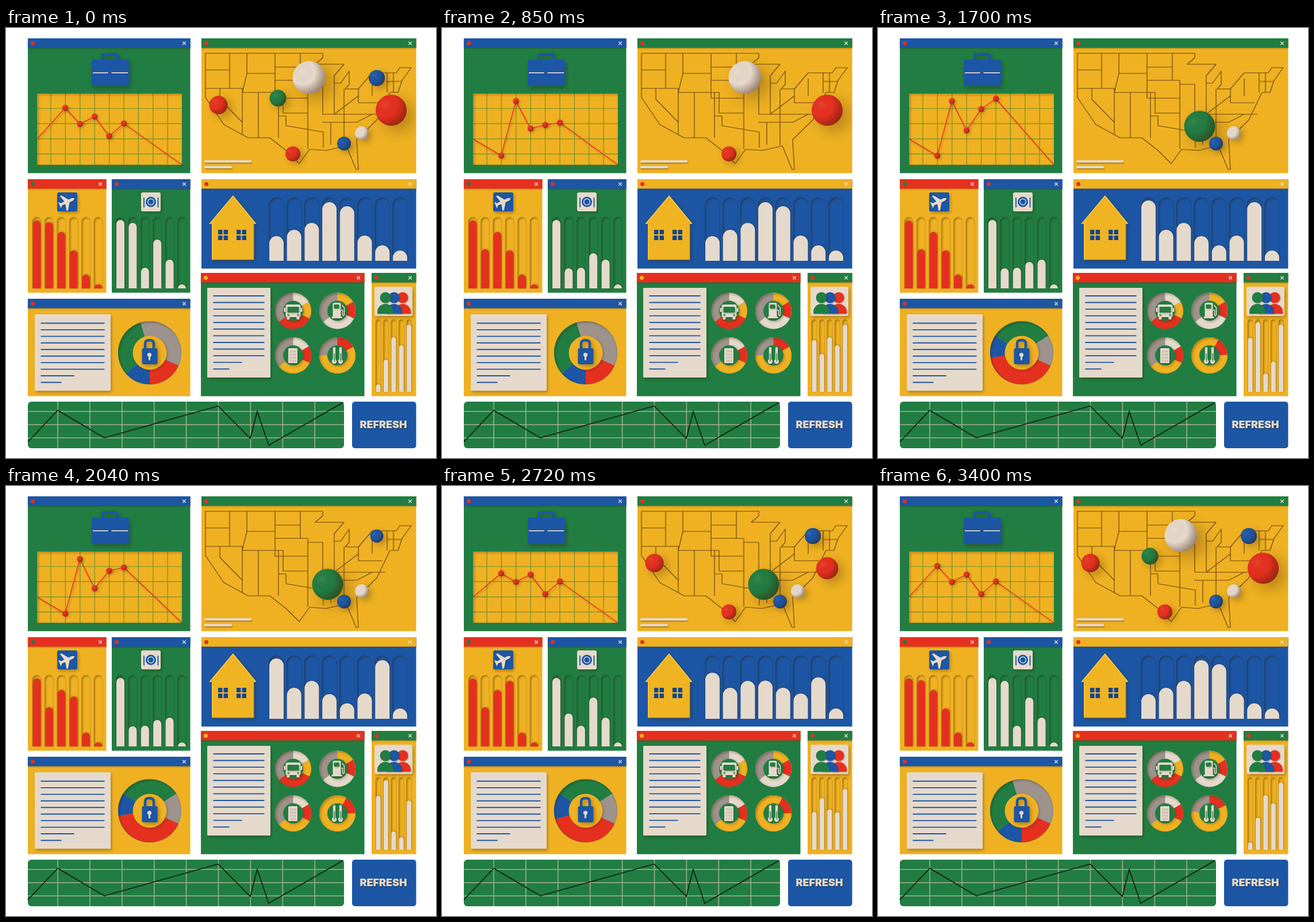
Recreate the animation shown at these times as an HTML page with a canvas. Size 748 by 748 pixels, loop 3570 ms.

```html
<!DOCTYPE html>
<html lang="en">
<head>
<meta charset="utf-8">
<title>Dashboard</title>
<style>
html, body { margin: 0; width: 100%; height: 100%; overflow: hidden; background: #fff; }
canvas { display: block; width: 748px; height: 748px; }
</style>
</head>
<body>
<canvas id="stage" width="748" height="748"></canvas>
<script>
const c = document.getElementById('stage').getContext('2d');
const STEP = 170, STEPS = 21;
const BLUE = '#1c56a4', GREEN = '#217d42', YELLOW = '#efb122', RED = '#e5301f',
      CREAM = '#e5d9cb', GRAY = '#9d938c', BROWN = '#6a4610';

const range = (count, start, gap) => Array.from({ length: count }, (_, i) => start + i * gap);

function ease(u) {
  u = Math.max(0, Math.min(1, u));
  return (1 - Math.cos(Math.PI * u)) / 2;
}
// Goes from a to b starting at step "out", and returns starting at step "back".
function swing(n, a, b, out, back, len = 3.5) {
  return a + (b - a) * (ease((n - out) / len) - ease((n - back) / len));
}

// Bar tops at rest; "to" holds the tops of the bars that move.
const charts = {
  travel: { x: 53.5, gap: 21.4, w: 15, top: 329, base: 453, fill: RED, well: YELLOW,
    tops: [335, 338, 355, 387, 429, 446], to: { 1: 385, 3: 339 },
    out: i => 4.7 * i - 3.7, back: () => 16.5 },
  food: { x: 199, gap: 21.4, w: 15, top: 329, base: 453, fill: CREAM, well: GREEN,
    tops: [334, 339, 417, 368, 403, 446], to: { 1: 418, 3: 407 },
    out: i => i, back: i => 16 - 1.25 * i },
  home: { x: 470.5, gap: 30.7, w: 26, top: 295, base: 405, fill: CREAM, well: BLUE,
    tops: [362, 351, 339, 303, 310, 361, 378, 387], to: { 0: 300, 3: 362, 4: 378, 6: 303 },
    out: () => 5, back: () => 15, len: 2.3 },
  people: { x: 647.5, gap: 13.4, w: 9, top: 507, base: 633, fill: CREAM, well: YELLOW,
    tops: [620, 577, 538, 552, 516], to: { 0: 539, 1: 512, 2: 601, 3: 611, 4: 588 },
    out: i => 2 + 2.1 * i, back: i => 14.6 - .3 * i }
};

// Listed in the order they appear: x, y, radius, color, step of leaving.
const balls = [
  [559.5, 171, 27, GREEN, 17],
  [619, 183, 12, CREAM, 1],
  [588, 201, 12, BLUE, 1],
  [645, 87, 14, BLUE, 1],
  [499, 219, 13, RED, 7],
  [369.5, 134, 16, RED, 1],
  [670, 143, 27, RED, 7],
  [473, 122, 14.5, GREEN, 0],
  [527, 86, 28.5, CREAM, 7]
];

const coast = new Path2D('M347 44H551V52L538 63H588L571 83V96H582L597 75V98L590 106H613L637 78H679L685 69H705L689 91 682 112H668L645 160 610 194 613 246H609L592 205 557 213 528 211 510 236 487 213 459 191H421L379 168 347 121Z');
const borders = new Path2D('M389 44V105M347 73H389M347 105H411V185M372 105V124L411 164M419 44V79H468M419 79L411 112H482V148H525M439 112V191M474 112V191M468 44V122H525M468 68H512M512 44V91M468 91H525V210M474 153H487V170L552 181V208M525 98H551V150H660M550 164H610L637 150M565 164V203M588 106V204M571 96V150L613 118M613 106V130H655M637 88V118M663 78V112M674 78V112M663 93H688');

function shade(dx, dy, blur, a) {
  c.shadowColor = `rgba(45,25,0,${a})`;
  c.shadowOffsetX = dx; c.shadowOffsetY = dy; c.shadowBlur = blur;
}
function raised(draw, dx = 2, dy = 3, blur = 5, a = .32) {
  c.save(); shade(dx, dy, blur, a); draw(); c.restore();
}
function box(x, y, w, h, fill, r = 0) {
  c.fillStyle = fill;
  c.beginPath(); c.roundRect(x, y, w, h, r); c.fill();
}
function disc(x, y, r, fill) {
  c.fillStyle = fill;
  c.beginPath(); c.arc(x, y, r, 0, 7); c.fill();
}
function line(points, color, width) {
  c.strokeStyle = color; c.lineWidth = width;
  c.beginPath(); points.forEach(p => c.lineTo(...p)); c.stroke();
}
function shape(d, fill) { c.fillStyle = fill; c.fill(new Path2D(d)); }
function stroke(d, color, width) {
  c.strokeStyle = color; c.lineWidth = width; c.stroke(new Path2D(d));
}

function panel(x, y, w, h, head, body, dot) {
  box(x, y, w + .5, h + .5, body);
  raised(() => box(x, y, w + .5, 16.5, head), 0, 1, 2, .25);
  disc(x + 8.5, y + 8.5, 3.6, dot);
  stroke(`M${x + w - 12.7} ${y + 5.8}l5.4 5.4m0 -5.4l-5.4 5.4`, CREAM, 1.5);
}

function grid(xs, ys, x, y, w, h, color, width) {
  xs.forEach(k => line([[k, y], [k, y + h]], color, width));
  ys.forEach(k => line([[x, k], [x + w, k]], color, width));
}

// Dark edges on the upper left of a sunken area.
function inset(path, blur, a) {
  c.save();
  c.clip(path);
  shade(2, 2, blur, a);
  const hole = new Path2D();
  hole.rect(-50, -50, 850, 850);
  hole.addPath(path);
  c.fill(hole, 'evenodd');
  c.restore();
}

function arch(x, y, w, base) {
  const r = Math.min(w / 2, base - y), p = new Path2D();
  p.roundRect(x - w / 2, y, w, base - y, [r, r, 0, 0]);
  return p;
}

function bars(chart, n) {
  const { x, gap, w, top, base, fill, well, tops, to, out, back, len } = chart;
  tops.forEach((y, i) => {
    const cx = x + i * gap, trough = arch(cx, top, w, base);
    c.fillStyle = well; c.fill(trough);
    inset(trough, 3, .36);
    c.strokeStyle = 'rgba(40,25,0,.2)'; c.lineWidth = .8; c.stroke(trough);
    const bar = arch(cx, swing(n, y, to[i] ?? y, out(i), back(i), len), w - 1, base);
    raised(() => { c.fillStyle = fill; c.fill(bar); }, 1, -1, 3, .28);
  });
}

function sector(x, y, r, from, to, fill) {
  const rad = d => (d - 90) * Math.PI / 180;
  c.fillStyle = fill;
  c.beginPath(); c.moveTo(x, y); c.arc(x, y, r, rad(from), rad(to)); c.fill();
}
// Colors fill the gaps between the given angles; the rest stays gray.
function donut(x, y, r, hole, angles, colors, middle) {
  disc(x, y, r, GRAY);
  colors.forEach((fill, i) => sector(x, y, r, angles[i], angles[i + 1], fill));
  const edge = new Path2D();
  edge.arc(x, y, r, 0, 7);
  inset(edge, 4, .35);
  raised(() => disc(x, y, hole, middle), 2, 2, 4, .25);
}

function ball(x, y, r, color) {
  if (r < .4) return;
  raised(() => disc(x, y, r, color), r * .45, r * .35, r, .3);
  const g = c.createRadialGradient(x - r * .4, y - r * .35, 0, x - r * .35, y - r * .3, r * 1.5);
  g.addColorStop(0, 'rgba(255,235,210,.1)');
  g.addColorStop(.5, 'rgba(60,25,0,0)');
  g.addColorStop(1, 'rgba(60,25,0,.5)');
  disc(x, y, r, g);
}

function paper(x, y, w, h, first, gap, count, short) {
  raised(() => box(x, y, w, h, CREAM, 1));
  range(count, first, gap).forEach((k, i) => {
    const left = count - i;
    const len = left > 2 ? w - 21 : short - (2 - left) * 22;
    box(x + 10.5, k - 1, len, 1.9, BLUE);
  });
}

function trendPanel(n) {
  panel(38, 18, 282, 234, BLUE, GREEN, RED);
  c.lineJoin = 'round';
  raised(() => {
    stroke('M168 57V49Q168 46 172 46H190Q194 46 194 49V57', BLUE, 4.5);
    box(149, 55, 65, 46, BLUE, 4);
  }, 3, 4, 7);
  box(151, 77, 61, 1.8, CREAM);
  disc(180.5, 78, 3, BLUE);

  box(54, 114, 252, 124, YELLOW);
  const well = new Path2D();
  well.rect(54, 114, 252, 124);
  grid(range(9, 78, 25.4), range(4, 140, 26.4), 54, 114, 252, 124, '#6f902c', 1.2);
  inset(well, 5, .32);
  const high = [139, 167, 154, 188, 166], low = [222, 127, 178, 141, 123];
  const pts = high.map((y, i) =>
    [103 + i * 25.5, swing(n, y, low[i], 1.15 * i, 13.4 - .75 * i)]);
  raised(() => line([[54, 193], ...pts, [306, 238]], RED, 1.5), 2, 3, 3, .2);
  pts.forEach(([x, y]) => ball(x, y, 5.2, RED));
}

function mapPanel(n) {
  panel(340, 18, 373, 234, GREEN, YELLOW, RED);
  c.save();
  c.beginPath(); c.rect(340, 35, 373.5, 217.5); c.clip();
  c.strokeStyle = BROWN; c.lineWidth = 1.2;
  c.stroke(coast);
  c.stroke(borders);
  raised(() => {
    box(345, 230, 82, 4, CREAM, 1.5);
    box(345, 240, 48, 4, CREAM, 1.5);
  }, 1, 2, 2);
  balls.forEach(([x, y, r, color, hide], i) => {
    const show = i < 3 ? 7.5 : 6 + 1.4 * i;
    const size = hide < show ? swing(n, 1, 0, hide, show, 2.5) : swing(n, 0, 1, show, hide, 2.5);
    ball(x, y, r * size, color);
  });
  c.restore();
}

function travelPanel(n) {
  panel(38, 263, 136, 197, RED, YELLOW, GREEN);
  raised(() => box(89, 286, 35, 33, BLUE, 3));
  c.save();
  c.translate(106, 302.5); c.rotate(1.15);
  raised(() => shape('M0 -15L2.5 -11V-4L14 4V7L2.5 4 2 10 6 14H-6L-2 10 -2.5 4 -14 7V4L-2.5 -4V-11Z', CREAM), 1, 1, 2);
  c.restore();
  bars(charts.travel, n);
}

function foodPanel(n) {
  panel(184, 263, 136, 197, BLUE, GREEN, RED);
  raised(() => box(235, 286, 34, 33, CREAM, 3));
  [[9, BLUE], [6, CREAM], [4.6, BLUE]].forEach(([r, fill]) => disc(252, 302.5, r, fill));
  stroke('M240 295V312M264.5 295V312', BLUE, 1.8);
  bars(charts.food, n);
}

function homePanel(n) {
  panel(340, 263, 373, 155, YELLOW, BLUE, RED);
  raised(() => shape('M395 291L436 341H431V403H358V341H353Z', '#f0b422'), 3, 3, 6);
  stroke('M355 340L395 292.5 434 340M359 341V402', '#f8c94b', 1.2);
  stroke('M358 403H431V342', '#c48a16', 1);
  [369, 401].forEach(x => {
    box(x, 351, 17, 18, '#174685');
    stroke(`M${x + 8.5} 351v18M${x} 360h17`, '#efbd46', 2);
  });
  bars(charts.home, n);
}

function lockPanel(n) {
  panel(38, 471, 282, 169, BLUE, YELLOW, RED);
  paper(50, 498, 132, 133, 513.5, 11.45, 10, 58);
  const turn = swing(n, 0, 74, 5, 17, 2.3);
  const angles = [114, swing(n, 180, 261, 7, 15.5, 2.8), 229 + turn, 343 + turn];
  donut(250, 565, 55, 29.5, angles, [RED, BLUE, GREEN], YELLOW);
  raised(() => {
    stroke('M242 559V549Q242 543 249.5 543Q257 543 257 549V559', BLUE, 4.5);
    box(236.5, 557, 27, 28, BLUE, 3);
  }, 3, 3, 6);
  disc(249.5, 568.5, 3.6, CREAM);
  box(248, 570, 3, 8, CREAM);
}

// Icons are drawn around their own center.
function busIcon() {
  box(-13, -11, 26, 22, CREAM, 3);
  [-16, 13].forEach(x => box(x, -5, 3, 7, CREAM, 1));
  [-11, 6].forEach(x => box(x, 10, 5, 5, CREAM, 1));
  box(-10, -7, 20, 10, GREEN, 1);
  [-8.5, 8.5].forEach(x => disc(x, 7, 1.5, GREEN));
}
function pumpIcon() {
  box(-8, -14, 14, 26, CREAM, 2);
  box(-10, 10, 18, 3, CREAM, 1);
  box(-6, -11, 9, 7, GREEN, 1);
  stroke('M6 -1H9V7Q11 10 12 7V-5L8 -10', CREAM, 1.6);
}
function calcIcon() {
  box(-8.5, -12.5, 16, 26, CREAM, 1.5);
  for (let i = 0; i < 12; i++) box(-6 + i % 3 * 4.2, -9 + (i / 3 | 0) * 5.5, 2, 2, '#cabfb1');
}
function thermoIcon() {
  [-5.5, 5.5].forEach(x => {
    box(x - 2.2, -14.5, 4.4, 25, CREAM, 2.2);
    disc(x, 10.5, 4.2, CREAM);
    stroke(`M${x} 10V-4`, GREEN, 1.2);
  });
}

function usagePanel(n) {
  panel(339, 426, 284, 214, RED, GREEN, YELLOW);
  paper(350, 452, 110, 156, 466, 11.57, 12, 50);
  const split = [0, 60, 115, 232];
  const warm = [swing(n, 62, 90, 7, 17), 270 + swing(n, 0, 120, 5, 17)];
  [
    [busIcon, split, [CREAM, YELLOW, RED]],
    [pumpIcon, split, [YELLOW, RED, CREAM]],
    [calcIcon, split, [CREAM, RED, YELLOW]],
    [thermoIcon, [0, ...warm], [RED, YELLOW]]
  ].forEach(([icon, angles, colors], i) => {
    c.save();
    c.translate(499.5 + i % 2 * 77, 492 + (i >> 1) * 77.5);
    donut(0, 0, 31.5, 17.5, angles, colors, GREEN);
    raised(icon, 1, 1.5, 2);
    c.restore();
  });
}

function peoplePanel(n) {
  panel(636, 426, 77, 214, GREEN, YELLOW, RED);
  raised(() => box(641, 450, 66, 51, CREAM, 3));
  [RED, BLUE, GREEN].forEach((color, i) => {
    const x = 690 - i * 15;
    raised(() => {
      box(x - 14, 480, 28, 17, color, [14, 14, 0, 0]);
      disc(x, 469, 9.5, color);
    }, 1, 1, 2);
  });
  bars(charts.people, n);
}

function footer() {
  box(38, 650, 550, 81, GREEN, 6);
  grid(range(9, 90, 55.9), range(3, 667, 23), 38, 650, 550, 81, '#a5b28f', 1.5);
  c.lineJoin = 'miter';
  line([[38, 720], [90, 665], [171, 713], [369, 657.5], [425, 714], [437, 667],
    [457, 726], [587, 651]], '#0c140d', 1.5);
  box(602, 650, 111.5, 81, BLUE, 5);
  c.font = '900 18px Inter, sans-serif';
  c.textAlign = 'center';
  raised(() => { c.fillStyle = CREAM; c.fillText('REFRESH', 656.5, 696); }, 1, 2, 2);
}

function draw(n) {
  c.fillStyle = '#fff';
  c.fillRect(0, 0, 748, 748);
  [trendPanel, mapPanel, travelPanel, foodPanel, homePanel,
    lockPanel, usagePanel, peoplePanel, footer].forEach(part => part(n));
}

let shown = -1;
function tick() {
  const n = Math.floor(performance.now() / STEP) % STEPS;
  if (n !== shown) draw(shown = n);
  requestAnimationFrame(tick);
}
tick();
</script>
</body>
</html>
```
